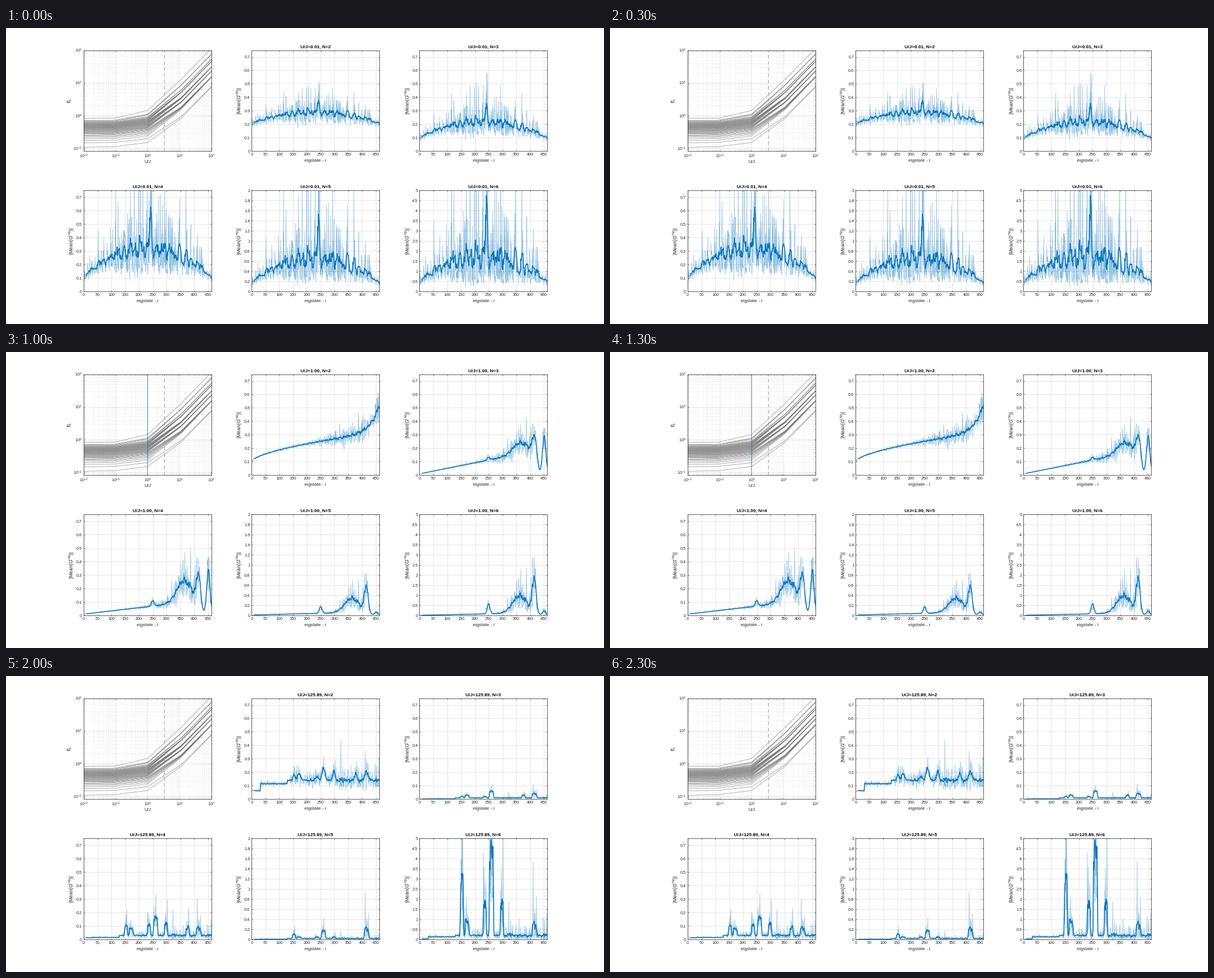
A matplotlib script for the animation above (2500 ms loop, 1062 by 527 pixels).

```python
import itertools

import matplotlib.pyplot as plt
import numpy as np
from matplotlib.animation import FuncAnimation
from matplotlib.ticker import FuncFormatter, LogLocator, NullFormatter

W, H, DPI = 1062, 527, 64
PX = 72 / DPI  # points per pixel
BLUE, INK = "#0072BD", "#262626"
LEFTS, BOTTOMS, WIDTH, HEIGHT = (0.13, 0.4108, 0.6916), (0.5838, 0.11), 0.2134, 0.3412
RATIOS = 10 ** np.linspace(-2.1, 2.1, 5)
STATES = np.arange(1, 463)
U = STATES / 462

plt.rcParams.update({
    "font.family": "Liberation Sans", "mathtext.default": "regular",
    "text.color": INK, "axes.edgecolor": INK, "axes.linewidth": 0.75 * PX,
    "xtick.color": INK, "ytick.color": INK, "path.simplify": False,
})

# Levels below are listed for the correlation orders 2 to 6.
EDGE = (0.20, 0.09, 0.09, 0.14, 0.40)
CREST = (0.29, 0.22, 0.32, 0.66, 1.75)
SLOPE = (0, 0.19, 0.11, 0.06, 0.13)
SECTORS = np.array([  # plateaus of states with 0, 1 and more excitations
    (0.063, 0.002, 0.012, 0.004, 0.03),
    (0.115, 0.003, 0.015, 0.006, 0.13),
    (0.140, 0.010, 0.030, 0.020, 0.20),
])
# Resonances: centre, half width, height in each order
BUMPS = {
    2: [(250, 7, (0, .02, .04, .13, .50)), (363, 38, (0, .08, .16, .28, .85)),
        (415, 9, (0, .11, .19, .50, 1.7)), (451, 9, (0, .27, .31, .05, .20))],
    3: [(142, 6, (0, .03, .07, .03, 2.6)), (182, 6, (.03, .01, .05, .03, .8)),
        (216, 7, (.03, .01, .14, .07, 2.2)), (254, 11, (.09, .05, .11, .18, 3.3)),
        (319, 6, (.05, .03, .13, .10, 2.8)), (372, 6, (.14, .06, .18, .65, 5.0)),
        (418, 9, (.18, .04, .18, .50, 2.2))],
    4: [(153, 6, (.04, .01, .07, .08, 2.8)), (172, 8, (.05, .02, .05, .03, .7)),
        (236, 6, (.03, .01, .08, .03, 1.6)), (260, 8, (.09, .05, .13, .15, 4.1)),
        (298, 6, (.07, 0, .09, .03, 1.6)), (376, 6, (.05, .02, .06, 0, 0)),
        (416, 9, (.06, .03, .05, .18, .5))],
}
NOISE = (0.25, 0.22, 0.15, 0.36, 0.36)
ENVELOPES = (
    0.45 + 0.55 * np.sin(np.pi * U),
    np.clip(STATES / 200, 0.4, 1),
    np.clip((STATES - 150) / 180, 0.25, 1),
    np.select([STATES < 125, STATES < 300], [0.25, 0.6], 1),
    np.select([STATES < 140, STATES < 300], [0.25, 0.6], 1),
)


def smooth(values, width):
    window = np.ones(width)
    count = np.convolve(np.ones_like(values), window, "same")
    return np.convolve(values, window, "same") / count


def bump(centre, half_width, power=2):
    return np.exp(-np.abs((STATES - centre) / half_width) ** power)


def trend(step, order):
    """Running mean that the noise is laid over."""
    k = order - 2
    if step == 0:
        arch = np.sin(np.pi * U) ** 0.7
        return (EDGE[k] + (CREST[k] - EDGE[k]) * arch) * (1 + 0.2 * (order - 1) * bump(241, 6, 6))
    if step == 1:
        return EDGE[k] * 0.85 + (1.08 * CREST[k] - 0.85 * EDGE[k]) * np.sin(2.6 * U ** 1.1)
    if step == 2:
        if order == 2:
            return 0.1 + 0.22 * U ** 0.6 + 0.2 * U ** 14
        base = SLOPE[k] * U / (1 + np.exp((STATES - 428) / 3)) + 0.01
    else:
        base = SECTORS[np.searchsorted((31, 128), STATES), k]
    power = 2 if step == 2 or order == 2 else 8
    return base + sum(heights[k] * bump(centre, half, power) for centre, half, heights in BUMPS[step])


def curve(step, order):
    """Noisy series and its running mean."""
    rng = np.random.default_rng(step + 4)
    noise = rng.normal(size=STATES.size)
    if step < 2:
        noise = np.minimum(rng.exponential(size=STATES.size), 3) + 0.35 * noise
    ratio = np.exp(NOISE[step] * (order - 1) ** 0.8 * ENVELOPES[step] * noise)
    ratio /= smooth(ratio, 25 if step < 2 else 10)
    mean = trend(step, order)
    return mean * ratio, mean * smooth(ratio, 10)


def energy_levels():
    """Spectra of six bosons hopping on an open chain of six sites."""
    basis = [s for s in itertools.product(range(7), repeat=6) if sum(s) == 6]
    index = {s: i for i, s in enumerate(basis)}
    hop = np.zeros((len(basis), len(basis)))
    for s, i in index.items():
        for site in range(5):
            if s[site]:
                moved = list(s)
                moved[site] -= 1
                moved[site + 1] += 1
                j = index[tuple(moved)]
                hop[i, j] = hop[j, i] = np.sqrt(s[site] * moved[site + 1])
    pairs = np.array([sum(n * (n - 1) for n in s) for s in basis])
    spectra = [np.linalg.eigvalsh(np.diag(ratio * pairs) - hop) for ratio in RATIOS]
    return np.array([(e - e[0])[11::10] / 26.67 for e in spectra])


fig = plt.figure(figsize=(W / DPI, H / DPI), dpi=DPI, facecolor="white")


def label(x, y, text, size=8.2, **style):
    style = {"ha": "center", "va": "baseline", **style}
    return fig.text(x / W, 1 - y / H, text, fontsize=size * PX, **style)


def panel(slot, xlabel, ylabel, drop, shift):
    left, bottom = LEFTS[slot % 3], BOTTOMS[slot // 3]
    ax = fig.add_axes((left, bottom, WIDTH, HEIGHT))
    ax.set_axisbelow(True)
    ax.tick_params(which="both", direction="in", top=True, right=True, width=0.6 * PX,
                   labelsize=7.2 * PX, pad=3 * PX)
    ax.tick_params(which="major", length=2.3 * PX)
    ax.tick_params(which="minor", length=1.2 * PX)
    ax.grid(which="major", color=INK, alpha=0.15, lw=0.75 * PX)
    x, y = (left + WIDTH / 2) * W, (1 - bottom) * H
    label(x, y + drop, xlabel)
    label(left * W - shift, y - HEIGHT * H / 2, ylabel, 8.8, rotation=90, va="center")
    return ax, x, y - HEIGHT * H


ax, *_ = panel(0, "U/J", "E$_i$", 21, 25)
ax.set(xscale="log", yscale="log", xlim=(0.01, 100), ylim=(0.08, 100))
for axis in (ax.xaxis, ax.yaxis):
    axis.set_major_locator(LogLocator(numticks=9))
    axis.set_minor_locator(LogLocator(subs=range(2, 10), numticks=9))
    axis.set_major_formatter(FuncFormatter(lambda v, _: f"10$^{{{round(np.log10(v))}}}$"))
    axis.set_minor_formatter(NullFormatter())
ax.grid(which="minor", color=INK, alpha=0.22, lw=0.6 * PX, ls=(0, (1, 2)))
ax.plot(RATIOS, energy_levels(), color="0.45", lw=0.55 * PX)
ax.axvline(3.27, color="0.62", lw=1.1 * PX, ls=(0, (6, 4)))
marker = ax.axvline(RATIOS[0], color=BLUE, alpha=0.65, lw=1.2 * PX, zorder=3)

panels = []
for order, top, tick in ((2, .75, .1), (3, .75, .1), (4, .75, .1), (5, 2, .2), (6, 5, .5)):
    ax, x, y = panel(order - 1, "eigstate - i", "|Mean(G$^{(N)}$)|", 19, 21)
    ax.set(xlim=(0, 462), ylim=(0, top), xticks=range(0, 451, 50),
           yticks=np.arange(0, top + 1e-6, tick))
    ax.yaxis.set_major_formatter(FuncFormatter(lambda v, _: f"{v:.3g}"))
    raw, = ax.plot([], [], color=BLUE, alpha=0.5, lw=0.65 * PX)
    mean, = ax.plot([], [], color=BLUE, lw=1.5 * PX)
    title = label(x, y - 4, "", weight="bold", color="black")
    panels.append((order, raw, mean, title))


def update(step):
    marker.set_xdata([RATIOS[step]] * 2)
    for order, raw, mean, title in panels:
        values, average = curve(step, order)
        raw.set_data(STATES, values)
        mean.set_data(STATES[9:], average[9:])
        title.set_text(f"U/J={RATIOS[step]:.2f}, N={order}")


anim = FuncAnimation(fig, update, frames=5, init_func=lambda: update(0), interval=500, repeat=True)
plt.show()
```
